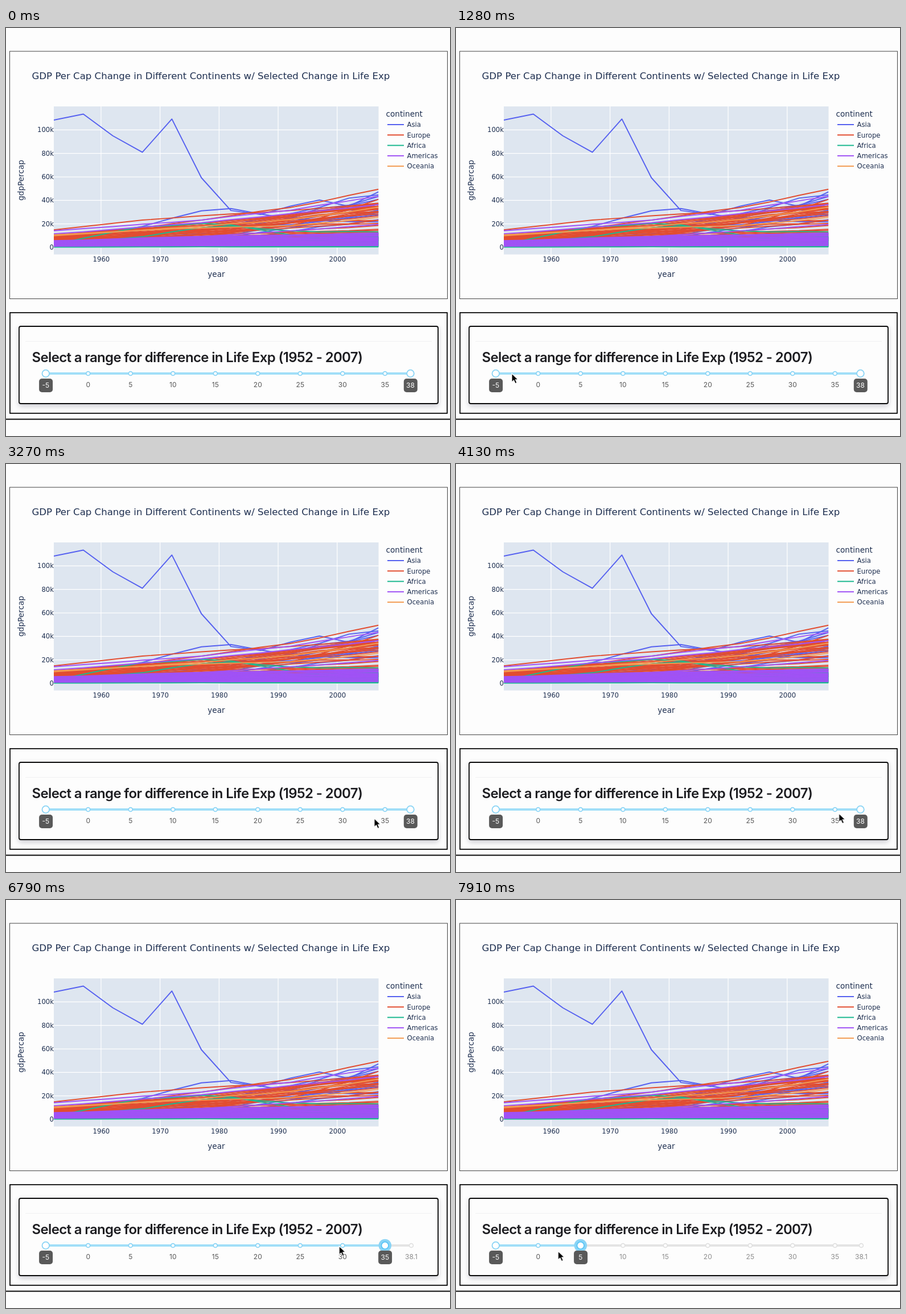
Recreate the animation shown at these times as an HTML page. Size 780x718 px, loop 8 s.

```html
<!DOCTYPE html>
<html lang="en">
<head>
<meta charset="utf-8">
<title>GDP per capita explorer</title>
<style>
  html, body { margin: 0; width: 100%; height: 100%; overflow: hidden; background: #fdfdfd; }
  svg { display: block; width: 780px; height: 718px; }
  .chart text { font: 11.67px "DejaVu Sans", sans-serif; fill: #1e2f50; }
  .chart .title { font-size: 16.58px; }
  .chart .axis { font-size: 13.6px; }
  .grid { stroke: #fff; stroke-width: 1.2; }
  .series { fill: none; stroke-width: 1.95; stroke-linejoin: round; }
  .card { fill: #fdfdfd; stroke: #0a0a0a; stroke-width: 1.8; filter: drop-shadow(0 4px 5px rgba(30, 30, 60, .22)); }
  .heading { font: 600 24px Inter, sans-serif; letter-spacing: -.65px; font-optical-sizing: none; fill: #1c1c20; }
  .slider text { font: 12px Inter, sans-serif; text-anchor: middle; fill: #8c8c8c; }
  .slider text.on { fill: #555; }
  .slider .tip text { fill: #fff; }
  .dot { fill: #fff; stroke: #e0e0e0; stroke-width: 1.7; }
  .dot.on { stroke: #8ad4f5; }
  .knob { fill: #fff; stroke: #8ad4f5; stroke-width: 1.8; }
  .halo { fill: #8ad4f5; opacity: 0; }
  .drag .halo { opacity: 1; }
  .drag .knob { stroke: #57c5f7; }
  #cursor { animation: move 8s linear infinite; }
  #arrow { animation: arrow 8s step-end infinite; }
  #hand { animation: hand 8s step-end infinite; stroke-linecap: round; stroke-linejoin: round; }
  @keyframes move {
    0%, 10.6% { transform: translate(30px, 607px); }
    14.5%, 16.5% { transform: translate(98px, 608px); }
    22% { transform: translate(230px, 618px); }
    30.6% { transform: translate(528px, 632px); }
    38% { transform: translate(640px, 626px); }
    51.6% { transform: translate(672.5px, 615px); }
    62%, 79% { transform: translate(708.5px, 611px); }
    84.9% { transform: translate(585px, 609px); }
    98.9% { transform: translate(179px, 618px); }
    100% { transform: translate(150px, 619px); }
  }
  @keyframes arrow {
    0% { opacity: 0; }
    10.6% { opacity: 1; }
    61% { opacity: 0; }
    80.5%, 100% { opacity: 1; }
  }
  @keyframes hand {
    0% { opacity: 0; }
    61% { opacity: 1; }
    80.5%, 100% { opacity: 0; }
  }
</style>
</head>
<body>
<svg viewBox="0 0 780 718">
  <defs>
    <clipPath id="plot"><rect x="84" y="138" width="570.5" height="260"/></clipPath>
    <path id="palm" d="M-5.2-5-3 1M-1.8-7.2-.8 0M2.2-7 2 0M6-4.6 4.8 1M-7.2 1-3 5M-3.5 1.5H5L4.5 4 3 7.5H-2L-4 4Z"/>
  </defs>
  <g class="chart">
    <rect x="6.5" y="41" width="769" height="435.5" fill="none" stroke="#444"/>
    <text class="title" x="45.5" y="90">GDP Per Cap Change in Different Continents w/ Selected Change in Life Exp</text>
    <rect x="84" y="138" width="570.5" height="260.5" fill="#dee6f0"/>
    <g id="grid"></g>
    <g id="lines" clip-path="url(#plot)"></g>
    <text class="axis" x="369.5" y="438" text-anchor="middle">year</text>
    <text class="axis" transform="translate(31 268) rotate(-90)" text-anchor="middle">gdpPercap</text>
    <text class="axis" x="667.5" y="156">continent</text>
    <g id="legend"></g>
  </g>
  <rect x="7" y="501" width="768" height="177" fill="none" stroke="#0a0a0a" stroke-width="1.8"/>
  <rect class="card" x="23" y="525" width="736" height="136" rx="3"/>
  <path d="M34 551.5H748" stroke="#f1f1f2"/>
  <path d="M0 688.5H780" stroke="#0a0a0a" stroke-width="1.8"/>
  <text class="heading" x="45.5" y="588">Select a range for difference in Life Exp (1952 - 2007)</text>
  <g class="slider" id="slider"></g>
  <g id="cursor">
    <path id="arrow" d="M0 0V15.2L3.6 11.9 6.1 17.6 8.9 16.4 6.5 10.9H11.2Z" fill="#000" stroke="#fff" stroke-width="1.1"/>
    <g id="hand">
      <use href="#palm" stroke="#111" stroke-width="4.2"/>
      <use href="#palm" fill="#fff" stroke="#fff" stroke-width="2"/>
    </g>
  </g>
</svg>
<script>
const LOOP = 8000;
const byId = id => document.getElementById(id);

function add(parent, tag, attrs = {}, text = '') {
  const node = document.createElementNS('http://www.w3.org/2000/svg', tag);
  for (const key in attrs) node.setAttribute(key, attrs[key]);
  node.textContent = text;
  return parent.appendChild(node);
}

// Chart axes: years across, thousands up
const yearX = year => 84 + (year - 1952) * 10.37;
const gdpY = k => 386 - k * 2.066;
const colors = { Asia: '#5661f0', Europe: '#e24d30', Africa: '#1db890', Americas: '#a052f5', Oceania: '#f39a50' };

for (let year = 1960; year <= 2000; year += 10) {
  add(byId('grid'), 'path', { class: 'grid', d: `M${yearX(year)} 138V398.5` });
  add(byId('grid'), 'text', { x: yearX(year) + .5, y: 411, 'text-anchor': 'middle' }, year);
}
for (let k = 0; k <= 100; k += 20) {
  const y = gdpY(k);
  add(byId('grid'), 'path', { class: 'grid', d: `M84 ${y}H654.5`, style: k ? '' : 'stroke-width:2' });
  add(byId('grid'), 'text', { x: 84, y: y + 4, 'text-anchor': 'end' }, k ? k + 'k' : '0');
}
Object.keys(colors).forEach((name, i) => {
  const y = 170 + i * 18.3;
  add(byId('legend'), 'path', { d: `M670 ${y}H699`, stroke: colors[name], 'stroke-width': 2 });
  add(byId('legend'), 'text', { x: 704.5, y: y + 4.2 }, name);
});

let seed = 7;
const random = () => (seed = seed * 16807 % 2147483647) / 2147483647;
const mix = (a, b, t) => a + (b - a) * t;

// One country: evenly spaced key values from 1952 to 2007, sampled every five years
function trend(name, keys, wobble = .015) {
  const points = [];
  for (let year = 1952; year <= 2007; year += 5) {
    const at = (year - 1952) / 55 * (keys.length - 1);
    const i = Math.min(Math.floor(at), keys.length - 2);
    const value = mix(keys[i], keys[i + 1], at - i) * (1 + (random() * 2 - 1) * wobble);
    points.push(`${yearX(year)},${gdpY(value)}`);
  }
  add(byId('lines'), 'polyline', { class: 'series', points: points.join(' '), stroke: colors[name] });
}

// Many countries spread between a low and a high trend
function band(name, count, low, high) {
  for (let n = 0; n < count; n++) {
    const rank = () => Math.min(1, Math.max(0, (n + random() - .5) / (count - 1)));
    trend(name, low.map((v, k) => mix(v, high[k], rank())), .04);
  }
}

trend('Asia', [108.4, 113.5, 95, 81, 109.3, 59.3, 31.4, 28, 35, 40.3, 35, 47.3], 0);
trend('Asia', [6.5, 16, 35, 23, 21.7]);
trend('Asia', [10, 14.8, 19.3, 19, 29.8]);
band('Asia', 7, [1, 5, 22], [3.2, 16, 47]);
band('Asia', 23, [.3, .5, 1], [4, 8, 12]);

trend('Europe', [10, 16, 25, 35, 49.4]);
trend('Europe', [14.7, 22.7, 27.6, 32, 37.5]);
trend('Europe', [5.2, 8, 12, 19, 40.7]);
band('Europe', 13, [6, 14, 28.5], [11, 21.5, 36.8]);
band('Europe', 5, [3.5, 10, 18], [6.5, 15, 27]);
band('Europe', 8, [1.5, 3.5, 6], [5, 11, 15.5]);

trend('Africa', [2.4, 17, 21, 9.7, 12]);
trend('Africa', [4.3, 8, 19, 13.5, 13.2]);
band('Africa', 48, [.3, .4, .3], [4.5, 6, 9]);

trend('Americas', [14, 19, 24.5, 32.5, 43]);
trend('Americas', [11.4, 22, 36.3]);
trend('Americas', [3.1, 9.8, 19.3]);
band('Americas', 22, [1, 1.4, 1.3], [5.7, 9.5, 12.5]);

trend('Oceania', [10, 14, 19, 24, 34.4]);
trend('Oceania', [10.6, 14.5, 17, 18.8, 25.2]);

// Range slider
const slider = byId('slider');
const RAIL_Y = 608;
const markX = value => 144.3 + value * 14.9;

const bar = (end, fill) => add(slider, 'rect', {
  x: markX(-5), y: RAIL_Y - 2, width: end - markX(-5), height: 4, rx: 2, fill
});
bar(markX(38.1), '#e4e4e4');
const track = bar(markX(38), '#a0def8');

const marks = Array.from({ length: 9 }, (_, i) => {
  const value = Math.min(i * 5, 38.1);
  return {
    value,
    dot: add(slider, 'circle', { cx: markX(value), cy: RAIL_Y, r: 3.4 }),
    label: add(slider, 'text', { x: markX(value), y: 631.5 }, value)
  };
});

function handle() {
  const group = add(slider, 'g');
  add(group, 'circle', { class: 'halo', cy: RAIL_Y, r: 11.3 });
  add(group, 'circle', { class: 'knob', cy: RAIL_Y, r: 6.3 });
  const tip = add(group, 'g', { class: 'tip' });
  add(tip, 'rect', { x: -11.7, y: 617, width: 24, height: 24, rx: 5, fill: '#595959' });
  const label = add(tip, 'text', { y: 633 });
  return value => {
    group.setAttribute('transform', `translate(${markX(value)} 0)`);
    label.textContent = value;
    return group;
  };
}
handle()(-5);
const setUpper = handle();

// The upper handle snaps from mark to mark during the drag
function upperValue(time) {
  if (time < 6740) return 38;
  return Math.max(5, 35 - 5 * Math.floor((time - 6740) / 184));
}

function render() {
  const time = performance.now() % LOOP;
  const value = upperValue(time);
  setUpper(value).setAttribute('class', time > 6400 ? 'drag' : '');
  track.setAttribute('width', markX(value) - markX(-5));
  for (const mark of marks) {
    const on = mark.value <= value ? 'on' : '';
    mark.dot.setAttribute('class', 'dot ' + on);
    mark.label.setAttribute('class', on);
  }
  requestAnimationFrame(render);
}
render();
</script>
</body>
</html>
```
